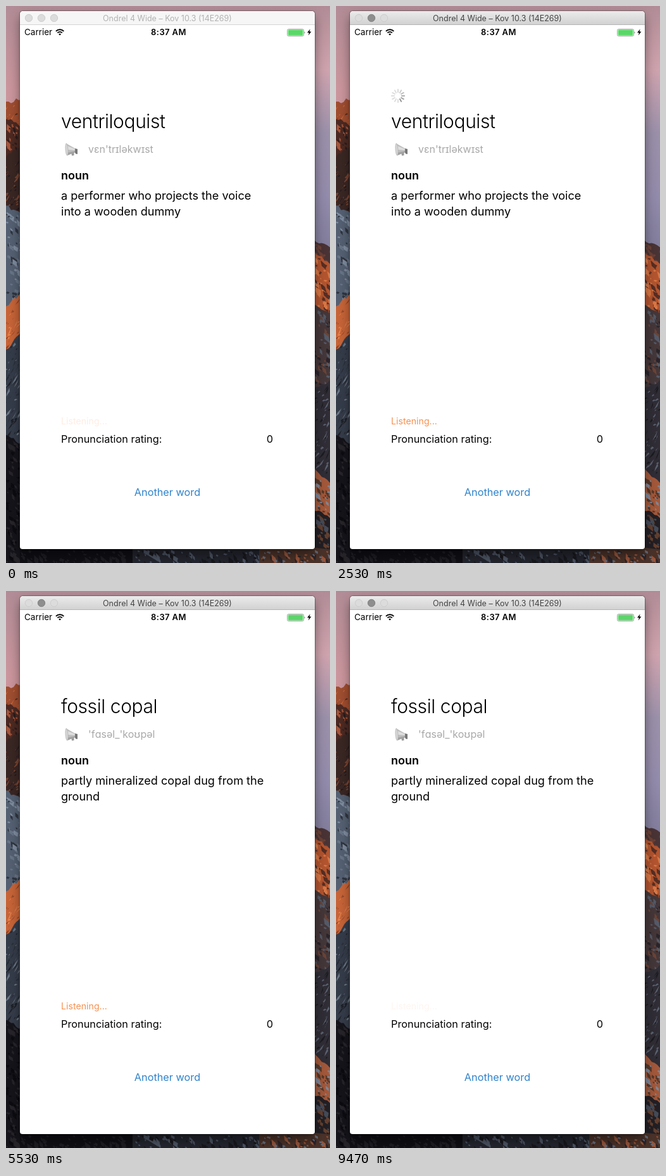
Animation of 512 by 880 pixels, one loop 9.54 s. Source, as an HTML page with a canvas:

```html
<!DOCTYPE html>
<html lang="en">
<head>
<meta charset="utf-8">
<title>Pronunciation trainer</title>
<style>
  html, body { margin: 0; width: 100%; height: 100%; overflow: hidden; background: #15141a; }
  #stage { position: relative; width: 512px; height: 880px; overflow: hidden; }
  #wall, #ui { position: absolute; left: 0; top: 0; display: block; }
  #win {
    position: absolute; left: 22px; top: 8px; width: 466px; height: 850px;
    border-radius: 5px 5px 4px 4px; background: #fff;
    box-shadow: 0 0 1px 1px rgba(0, 0, 0, .3), 0 9px 18px rgba(0, 0, 0, .42);
  }
  #bar {
    height: 21px; border-radius: 5px 5px 0 0; border-bottom: 1px solid #d4d4d4;
    background: #f6f6f6;
  }
  .active #bar { background: linear-gradient(#ebebeb, #d2d2d2); border-color: #b4b4b4; }
  text { font-family: Inter, "Noto Sans", sans-serif; fill: #000; white-space: pre; }
  #title { font-size: 12.5px; fill: #b2b2b2; text-anchor: middle; }
  .active #title { fill: #444; }
  #lights circle { fill: #dcdcdc; stroke: #cdcdcd; }
  .active #mid { fill: #8e8e8e; stroke: #828282; }
  .head { font-size: 30px; font-weight: 300; letter-spacing: -.42px; }
  .ipa { font-size: 16px; fill: #a9a9a9; }
  .noun { font-size: 18px; font-weight: 600; }
  .def { font-size: 18.13px; }
  .row { font-size: 16.3px; }
  #listen { font-size: 14.2px; fill: #f6904f; }
  .link { fill: #2f83cc; text-anchor: middle; }
</style>
</head>
<body>
<div id="stage">
  <canvas id="wall" width="512" height="880"></canvas>
  <div id="win"><div id="bar"></div></div>
  <svg id="ui" width="512" height="880" viewBox="0 0 512 880">
    <g id="lights">
      <circle cx="36" cy="19" r="5.7"/>
      <circle id="mid" cx="56" cy="19" r="5.7"/>
      <circle cx="76" cy="19" r="5.7"/>
    </g>
    <text id="title" x="255" y="24">Ondrel 4 Wide – Kov 10.3 (14E269)</text>

    <text x="29" y="46" font-size="13.5">Carrier</text>
    <g fill="none" stroke="#000" stroke-width="1.9">
      <path d="M78.9 39.8a8.8 8.8 0 0 1 12.4 0"/>
      <path d="M81.4 42.4a5.2 5.2 0 0 1 7.4 0"/>
      <path d="M85.1 46.5l-1.9-2.1a2.7 2.7 0 0 1 3.8 0z" fill="#000" stroke="none"/>
    </g>
    <text x="257" y="46" font-size="13" font-weight="600" letter-spacing=".4" text-anchor="middle">8:37 AM</text>
    <rect x="444.5" y="36.5" width="26" height="11" rx="2" fill="#fff" stroke="#8f8f8f" stroke-width=".8"/>
    <rect x="445.7" y="37.6" width="23.6" height="8.8" rx="1" fill="#5bd669"/>
    <path d="M471.6 40.2q1.8 1.7 0 3.5z" fill="#444"/>
    <path d="M480.6 36.2l-4.6 6h2.9l-1.1 4.4 4.6-6h-2.9z"/>

    <g id="spin" transform="translate(98 142)" stroke-width="1.9" stroke-linecap="round"></g>

    <g id="horn">
      <path d="M103 231l1 5.5 3.5-.4v-5.6z" fill="#9a9a9a"/>
      <path d="M95 217l14 8v6l-12 5z" fill="#bdbdbd"/>
      <path d="M97 221l12 5v2l-11-1z" fill="#dedede"/>
      <path d="M98 231.5l11-2v1.8l-12 4.7z" fill="#a2a2a2"/>
      <ellipse cx="96" cy="226.6" rx="2" ry="9.6" transform="rotate(-4 96 226.6)" fill="#d6d6d6" stroke="#b0b0b0" stroke-width=".7"/>
      <path d="M109 225l4 1v8l-3-.6-1-2z" fill="#777"/>
    </g>

    <text class="head" id="word" x="87" y="193"></text>
    <text class="ipa" id="ipa" x="130" y="232"></text>
    <text class="noun" x="87" y="274">noun</text>
    <text class="def" id="line1" x="87" y="306"></text>
    <text class="def" id="line2" x="87" y="331"></text>

    <text id="listen" x="87" y="661">Listening...</text>
    <text class="row" x="87" y="690">Pronunciation rating:</text>
    <text class="row" x="422" y="690" text-anchor="end">0</text>
    <text class="row link" x="255" y="774">Another word</text>
  </svg>
</div>
<script>
const $ = id => document.getElementById(id);
const LOOP = 9540, FPS = 15;
const LOAD = 1600, SWAP = 4670;      // request sent, next word shown
const PRESS = [8000, 8270];          // speaker button held down

const entries = [
  { word: "ventriloquist", ipa: "vɛn'trɪləkwɪst",
    line1: "a performer who projects the voice", line2: "into a wooden dummy" },
  { word: "fossil copal", ipa: "'fɑsəl_'koʊpəl",
    line1: "partly mineralized copal dug from the", line2: "ground" }
];

function paintWall() {
  const c = $("wall").getContext("2d");
  let seed = 17;
  const rnd = () => (seed = (seed * 16807) % 2147483647) / 2147483647;

  function poly(col, ...pts) {
    c.fillStyle = col;
    c.beginPath();
    for (const [x, y] of pts) c.lineTo(x, y);
    c.fill();
  }

  function sky(x, stops) {
    const g = c.createLinearGradient(0, 0, 0, 400);
    stops.forEach((col, i) => g.addColorStop(i / (stops.length - 1), col));
    c.fillStyle = g;
    c.fillRect(x, 0, 256, 400);
  }

  // A block of rock: sloping jagged top, then streaks running down the slope.
  function rock(x, y, w, h, slope, base, ...accents) {
    const top = [];
    for (let i = 0; i <= 6; i++) top.push([x + w * i / 6, y + slope * (i / 6 - .5) + rnd() * 6 - 3]);
    poly(base, ...top, [x + w, y + h + 20], [x, y + h + 20]);
    const dir = Math.sign(slope) || 1;
    for (let i = 0; i < w * h / 50; i++) {
      const px = x + rnd() * w;
      const py = y + slope * ((px - x) / w - .5) + 3 + rnd() * h;
      const len = 3 + 14 * rnd() ** 3, wide = 1 + 3 * rnd() ** 2;
      const run = dir * len * (.3 + rnd() * .5);
      poly(accents[i % accents.length],
        [px, py], [px + run * .6 + wide, py + len * .4],
        [px + run, py + len], [px + run * .3 - wide * .6, py + len * .6]);
    }
  }

  sky(0, ["#b18c96", "#cc969e", "#c9959a", "#a98088"]);
  sky(256, ["#b18c96", "#cfa3ae", "#9b90aa", "#938bab", "#7d7a98"]);

  rock(0, 150, 24, 34, -8, "#a04e30", "#d0703f", "#4a2a24");
  rock(0, 184, 24, 46, 16, "#4c2a23", "#a8563a", "#2b1d1d");
  rock(0, 230, 24, 92, -14, "#3a2724", "#7c4633", "#221b1e");
  rock(0, 322, 24, 140, 14, "#556173", "#7f8da0", "#30353f", "#687588");
  rock(0, 464, 24, 70, -24, "#c76438", "#8a4429", "#ea8851");
  rock(0, 530, 24, 150, -26, "#363d4a", "#6d7988", "#1e2027", "#2a2f39");
  rock(0, 684, 24, 196, 14, "#15141a", "#27252a", "#0c0c10");

  rock(486, 376, 26, 22, 10, "#4a3335", "#6b4238");
  rock(486, 398, 26, 80, 22, "#b3552f", "#d87846", "#562e24");
  rock(486, 478, 26, 120, 20, "#453739", "#6b4436", "#29242a", "#545a68");
  rock(486, 598, 26, 140, -14, "#302d36", "#5b6271", "#1b1b20");
  rock(486, 742, 26, 60, 22, "#a3583a", "#573829", "#7d879a");
  rock(486, 802, 26, 78, 14, "#221f24", "#65402f", "#454b58");

  rock(22, 856, 180, 24, 0, "#0f0f14", "#1e1d23");
  rock(200, 856, 200, 24, 0, "#23252e", "#4b5362", "#17171c");
  rock(400, 856, 112, 24, 0, "#4a3229", "#98553a", "#2a2328", "#656b7a");
}

const NS = "http://www.w3.org/2000/svg";
const spokes = Array.from({ length: 12 }, (_, i) => {
  const s = document.createElementNS(NS, "path");
  s.setAttribute("d", "M0-5.8V-10.2");
  s.setAttribute("transform", `rotate(${i * 30})`);
  return $("spin").appendChild(s);
});

const clamp = v => Math.min(1, Math.max(0, v));
const ease = v => (v = clamp(v), v * v * (3 - 2 * v));

function pulse(t) {
  const u = (t - 350 + 1500) % 1500;
  return ease(u / 670) * (1 - ease((u - 680) / 630));
}

let shown;
function draw(t) {
  $("stage").className = t >= LOAD ? "active" : "";
  const entry = entries[t >= SWAP ? 1 : 0];
  if (entry !== shown) {
    for (const id in entry) $(id).textContent = entry[id];
    shown = entry;
  }

  const busy = t >= LOAD && t < SWAP;
  $("spin").style.display = busy ? "" : "none";
  if (busy) {
    const lead = Math.floor(t * 12 / 1000) - 1;
    spokes.forEach((s, i) => {
      const age = (lead - i + 120) % 12;
      const grey = Math.min(222, 148 + age * 14);
      s.setAttribute("stroke", `rgb(${grey},${grey},${grey})`);
    });
  }

  $("horn").style.opacity = t >= PRESS[0] && t < PRESS[1] ? .5 : 1;
  $("listen").style.opacity = pulse(t);
}

function tick() {
  const t = performance.now() % LOOP;
  draw(Math.floor((t + 4) * FPS / 1000) * 1000 / FPS);
  requestAnimationFrame(tick);
}

paintWall();
tick();
</script>
</body>
</html>
```
